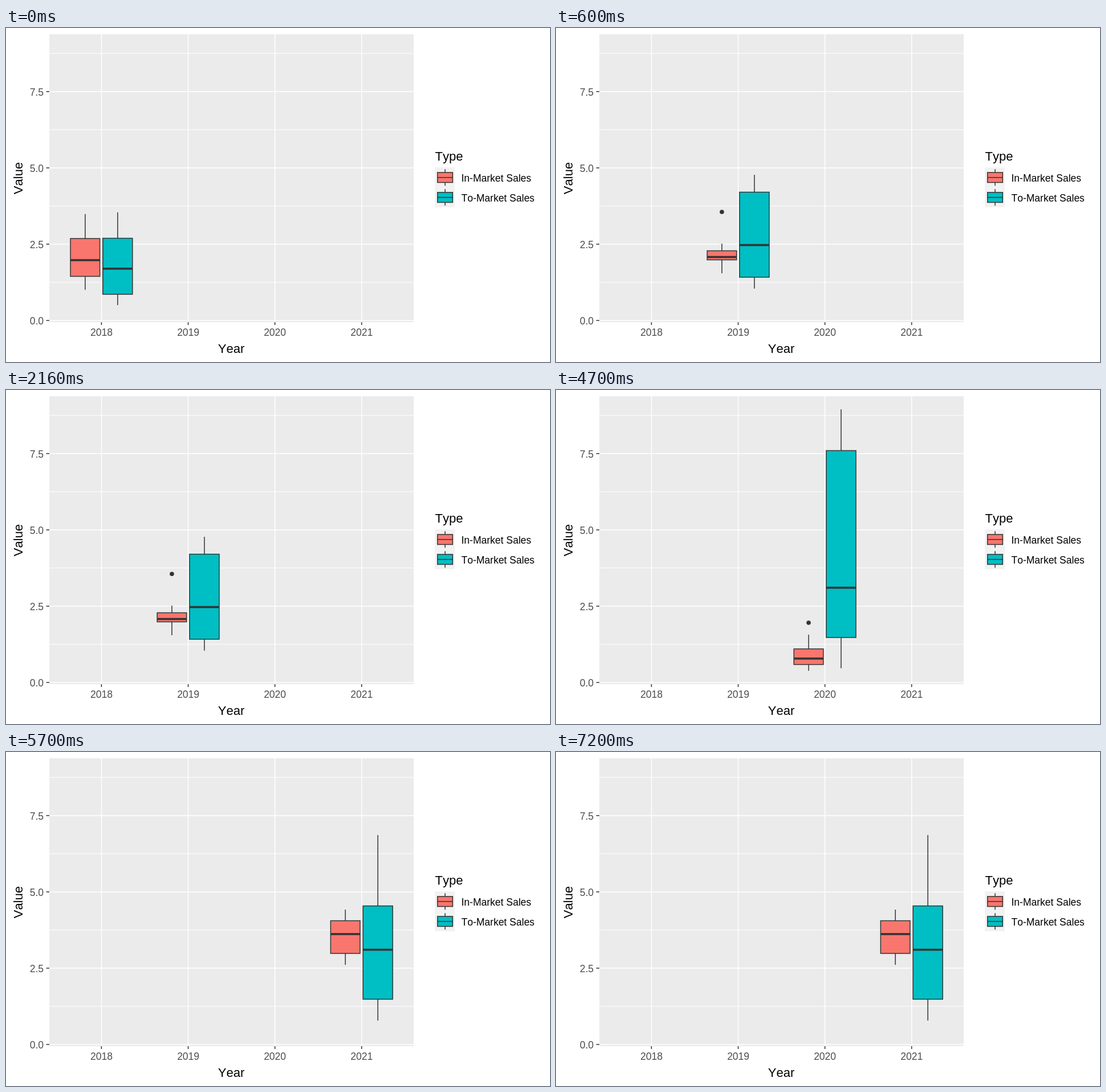
These frames come from a looping animation (954x587 px, 8.2 s). An HTML page with a canvas:

```html
<!DOCTYPE html>
<html lang="en">
<head>
<meta charset="utf-8">
<title>Sales by year</title>
<style>
html, body { margin: 0; width: 100%; height: 100%; overflow: hidden; background: #fff; }
canvas, svg { position: absolute; left: 0; top: 0; width: 954px; height: 587px; }
text { font-family: "Liberation Sans", Arial, sans-serif; font-kerning: none; font-size: 17.5px; }
.title { font-size: 22px; }
.mid { text-anchor: middle; }
.tick { fill: #4d4d4d; }
.right { text-anchor: end; }
</style>
</head>
<body>
<canvas id="plot" width="954" height="587"></canvas>
<svg viewBox="0 0 954 587">
  <g class="right">
    <text class="tick" x="66" y="118.5">7.5</text>
    <text class="tick" x="66" y="252.5">5.0</text>
    <text class="tick" x="66" y="386.5">2.5</text>
    <text class="tick" x="66" y="520.5">0.0</text>
  </g>
  <g class="mid">
    <text class="tick" x="167.5" y="541">2018</text>
    <text class="tick" x="319.6" y="541">2019</text>
    <text class="tick" x="471.6" y="541">2020</text>
    <text class="tick" x="623.7" y="541">2021</text>
    <text class="title" x="395" y="571">Year</text>
    <text class="title" transform="translate(29 264) rotate(-90)">Value</text>
  </g>
  <text class="title" x="752.5" y="233">Type</text>
  <text x="798.5" y="270">In-Market Sales</text>
  <text x="798.5" y="305">To-Market Sales</text>
</svg>
<script>
const ctx = document.getElementById("plot").getContext("2d");
const INK = "#333333", RED = "#F8766D", TEAL = "#00BFC4";
const LOOP = 8200;
const LINE = 1.5;
const yearX = i => 167.4 + 152.1 * i;
const valueY = v => 514 - 53.64 * v;

// Per year: start time, then [top, q3, median, q1, bottom, outlier] in stage pixels
const years = [
  { at: 0,    red: [327, 370, 408, 436.5, 460],          teal: [324, 369.5, 423, 468, 487] },
  { at: 600,  red: [379, 391.5, 402.5, 407.5, 431, 323.3], teal: [258, 288.5, 381.5, 438, 458] },
  { at: 3200, red: [430, 455, 472, 482.5, 493.5, 409],   teal: [34, 106.5, 347.5, 435, 489] },
  { at: 5700, red: [277, 296.5, 320, 354, 374],          teal: [146, 270.5, 347.5, 434.5, 472] }
];

function rect(x, y, w, h, color) {
  ctx.fillStyle = color;
  ctx.fillRect(x, y, w, h);
}

function hline(x1, x2, y, w, color) {
  rect(x1, y - w / 2, x2 - x1, w, color);
}

function vline(x, y1, y2, w, color) {
  rect(x - w / 2, y1, w, y2 - y1, color);
}

function box(x, half, [top, q3, median, q1, bottom, outlier], color, medianWidth) {
  vline(x, top, q3, LINE, INK);
  vline(x, q1, bottom, LINE, INK);
  rect(x - half, q3, 2 * half, q1 - q3, color);
  ctx.strokeStyle = INK;
  ctx.lineWidth = LINE;
  ctx.strokeRect(x - half, q3, 2 * half, q1 - q3);
  hline(x - half, x + half, median, medianWidth, INK);
  if (outlier) {
    ctx.fillStyle = INK;
    ctx.beginPath();
    ctx.arc(x, outlier, 3.8, 0, 2 * Math.PI);
    ctx.fill();
  }
}

function drawPanel() {
  rect(0, 0, 954, 587, "#fff");
  rect(76, 11, 639, 506, "#EBEBEB");
  for (let v = 1.25; v < 9; v += 2.5) hline(76, 715, valueY(v), 1, "#fff");
  for (let v = 0; v < 9; v += 2.5) {
    hline(76, 715, valueY(v), LINE, "#fff");
    hline(70.5, 76, valueY(v), LINE, INK);
  }
  for (let i = 0; i < 4; i++) {
    vline(yearX(i), 11, 517, LINE, "#fff");
    vline(yearX(i), 517, 522, LINE, INK);
  }
}

function drawKey(y, color) {
  box(770, 13.3, [y - 14.5, y - 8.8, y, y + 8.8, y + 14.5], color, LINE);
}

function drawLegend() {
  rect(752, 245, 35, 70, "#F2F2F2");
  drawKey(262.7, RED);
  drawKey(297.7, TEAL);
}

function draw(now) {
  const t = now % LOOP;
  const i = years.findLastIndex(y => t >= y.at);
  const x = yearX(i);
  drawPanel();
  drawLegend();
  box(x - 28.6, 25.8, years[i].red, RED, 3.6);
  box(x + 28.4, 26, years[i].teal, TEAL, 3.6);
}

const start = performance.now();
function tick() {
  draw(performance.now() - start);
  requestAnimationFrame(tick);
}
tick();
</script>
</body>
</html>
```
